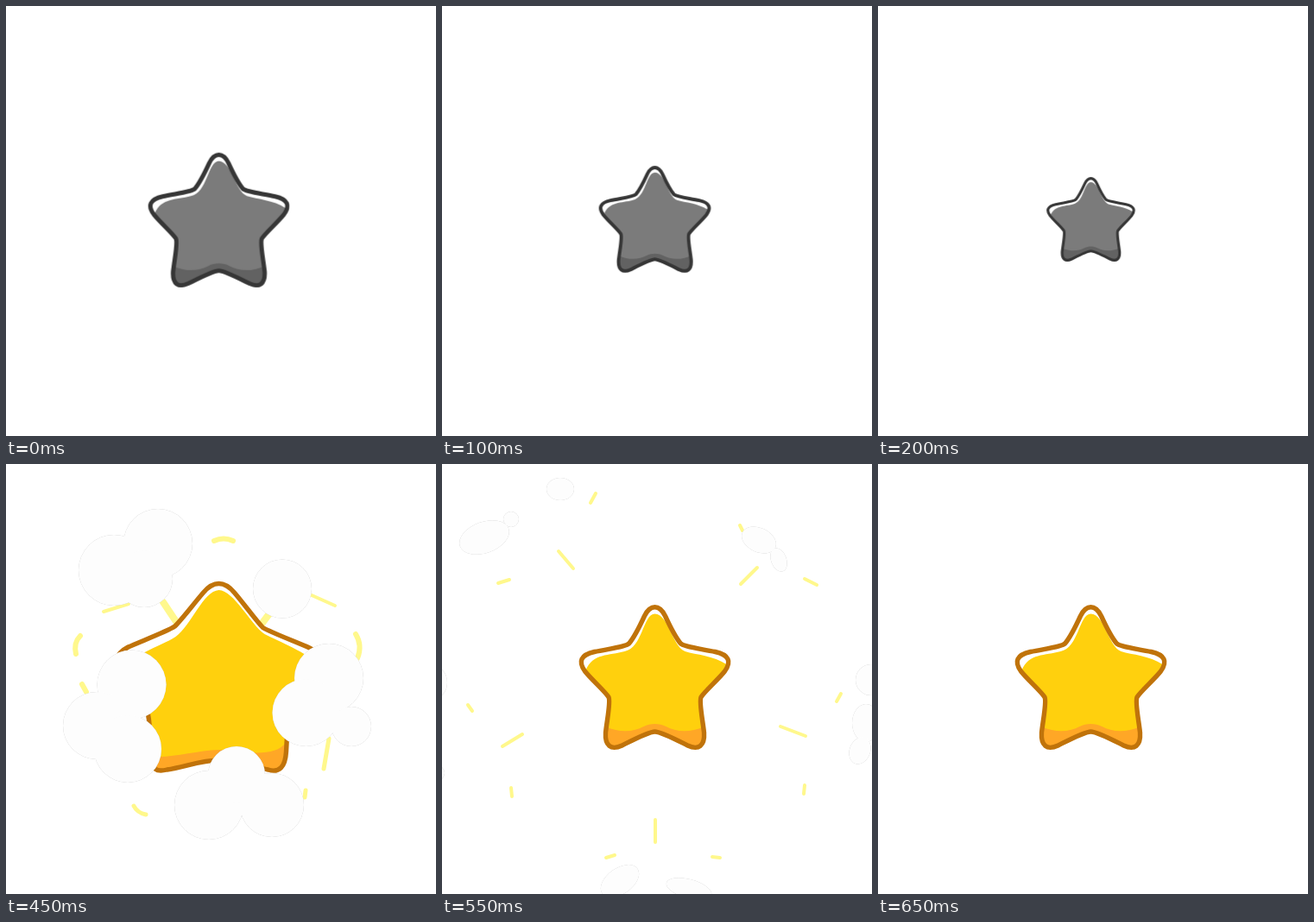
Animation, 498 px wide and 498 px high, one loop 700 ms. Source, as an HTML page without scripts:

```html
<!DOCTYPE html>
<html lang="en">
<head>
<meta charset="utf-8">
<title>Star burst</title>
<style>
  html, body { margin: 0; width: 100%; height: 100%; overflow: hidden; background: #fff; }
  svg { display: block; width: 100vw; height: 100vh; }

  .gray { --fill: #7b7b7b; --line: #363636; --shade: #626262; }
  .gold { --fill: #ffd00d; --line: #c0730a; --shade: #ffa726; }
  .body { fill: var(--fill); }
  .shade { fill: var(--shade); }
  .shine { fill: #fff; }
  .line { fill: none; stroke: var(--line); stroke-width: 5.4; stroke-linejoin: round; }

  .rays { fill: none; stroke: #fff88c; stroke-width: 4; stroke-linecap: round; }
  .clouds { fill: #fdfdfd; filter: drop-shadow(0 0 .5px #bbb); }

  /* Every animation shares the 700 ms loop and holds between keys. */
  .shrink, .rest, .beat { animation: 700ms step-end infinite; }
  .shrink { animation-name: shrink, until-burst; }
  .rest { animation-name: after-burst; }
  .beat { visibility: hidden; animation-name: beat; animation-delay: calc(var(--at) - 700ms); }

  @keyframes shrink {
    0% { transform: translateY(.9px) scale(.93); }
    7.142% { transform: translateY(.4px) scale(.832); }
    14.285% { transform: scale(.737); }
    21.428% { transform: scale(.656); }
    28.571%, 100% { transform: scale(.583); }
  }
  @keyframes until-burst {
    0% { visibility: visible; }
    64.285%, 100% { visibility: hidden; }
  }
  @keyframes after-burst {
    0% { visibility: hidden; }
    78.571%, 100% { visibility: visible; }
  }
  @keyframes beat {
    0% { visibility: visible; }
    7.142%, 100% { visibility: hidden; }
  }
</style>
</head>
<body>
<svg viewBox="0 0 498 498">
  <defs>
    <path id="calm-edge" d="M0-81.2C5-81.2 9-77 12-71C18-58 24-46 30-39C34-35 54-33 70-29.500C86-26 89-18 81-7C73 3 58 16 53.500 23C51 28 55 47 57 64C58 79 51 85 38 79C26 73 7 63 0 63C-7 63-26 73-38 79C-51 85-58 79-57 64C-55 47-51 28-53.500 23C-58 16-73 3-81-7C-89-18-86-26-70-29.500C-54-33-34-35-30-39C-24-46-18-58-12-71C-9-77-5-81.2 0-81.2Z"/>
    <g id="calm">
      <use href="#calm-edge" class="body"/>
      <path class="shine" d="M-80-8C-89-18-86-26-70-29.500C-54-33-34-35-30-39C-24-46-18-58-12-71C-9-77-5-81.2 0-81.2C5-81.2 9-77 12-71C18-58 24-46 30-39C34-35 54-33 70-29.500C84-26 87-20 83-15C68-25 48-26 35-30C20-36 16-73 0-73.500C-14-73-14-34-35-30C-53-25-72-28-80-8Z"/>
      <path class="shade" d="M-57 57C-40 65-24 63-13 57C-5 53 5 53 13 57C24 63 40 65 57 57V64C58 79 51 85 38 79C26 73 7 63 0 63C-7 63-26 73-38 79C-51 85-58 79-57 64Z"/>
      <use href="#calm-edge" class="line"/>
    </g>

    <path id="plump-edge" d="M0-93C7-93 12-88 16-82C25-69 34-55 42-47C47-43 68-40 80-36C97-31 102-20 94-8C86 4 70 20 66.500 31C64 44 67 60 67 75C67 92 62 98 45 92C30 87 10 78.500 0 78.500C-10 78.500-30 87-45 92C-62 98-67 92-67 75C-67 60-64 44-66.500 31C-70 20-86 4-94-8C-102-20-97-31-80-36C-68-40-47-43-42-47C-34-55-25-69-16-82C-12-88-7-93 0-93Z"/>
    <g id="plump">
      <use href="#plump-edge" class="body"/>
      <path class="shine" d="M-93-8C-102-20-97-31-80-36C-68-40-47-43-42-47C-34-55-25-69-16-82C-12-88-7-93 0-93C7-93 12-88 16-82C25-69 34-55 42-47C47-43 68-40 80-36C95-31 99-22 95-14C80-27 60-33 48-39C29-51 17-84 0-85C-14-84-18-47-34-41C-57-32-82-34-93-8Z"/>
      <path class="shade" d="M-67 68C-48 80-28 76-14 71C-5 68 5 68 14 71C28 76 48 80 67 68V75C67 92 62 98 45 92C30 87 10 78.500 0 78.500C-10 78.500-30 87-45 92C-62 98-67 92-67 75Z"/>
      <use href="#plump-edge" class="line"/>
    </g>

    <path id="swollen-edge" d="M0-108.500C8-108.500 13-104 18-98C30-84 42-67 51-57.500C60-52 92-40 105-34C120-27 122-17 114-4C100 14 85 28 82 43C79 58 79 70 78 86C77 104 70 111 57 107C40 103 20 96 0 96C-20 96-40 104-60 107C-72 110-78 108-79 88C-80 70-79 58-82 43C-85 28-100 14-114-4C-122-17-120-27-105-35C-92-41-60-53-51-59C-42-68-30-84-18-98C-13-104-8-108.500 0-108.500Z"/>
    <g id="swollen">
      <use href="#swollen-edge" class="body"/>
      <path class="shine" d="M-114-4C-122-17-120-27-105-35C-92-41-60-53-51-59C-42-68-30-84-18-98C-13-104-8-108.500 0-108.500C8-108.500 13-104 18-98C30-84 42-67 51-57.500C60-52 92-40 105-34C118-27 120-20 114-14C105-28 68-42 53-50C36-62 18-100 0-101C-18-100-32-60-50-47C-68-35-107-25-114-4Z"/>
      <path class="shade" d="M-79 91C-60 95-28 85 0 84C25 85 65 95 78 75V86C77 104 70 111 57 107C40 103 20 96 0 96C-20 96-40 104-60 107C-72 110-78 108-79 88Z"/>
      <use href="#swollen-edge" class="line"/>
    </g>
  </defs>

  <g transform="translate(246.5 247)">
    <use href="#calm" class="gray shrink"/>
    <use href="#calm" class="gold rest"/>
  </g>

  <g class="beat" style="--at: 450ms">
    <g class="rays">
      <path d="M113 171L142 162M354 152L381 164"/>
      <path d="M148 396Q152 404 162 406M374 318L368 353M347 378L346 386" style="stroke-width: 5"/>
      <path d="M241 89Q252 84 263 89M86 199Q78 207 81 220M405 197Q413 210 407 225M88 255L93 264" style="stroke-width: 6"/>
      <path d="M182 160L198 184M297 184L306 172" style="stroke-width: 8"/>
    </g>
    <use href="#swollen" class="gold" x="246.5" y="247"/>
    <g class="clouds">
      <circle cx="176" cy="92" r="40"/><circle cx="125" cy="123" r="41"/><circle cx="160" cy="133" r="33"/>
      <circle cx="320" cy="144.500" r="34"/>
      <circle cx="145.500" cy="255.500" r="40"/><circle cx="105" cy="303" r="39"/><circle cx="141" cy="330" r="39"/>
      <circle cx="374" cy="248" r="40"/><circle cx="347.500" cy="288" r="39"/><circle cx="400" cy="304" r="23"/>
      <circle cx="235" cy="395" r="40"/><circle cx="267" cy="360" r="33"/><circle cx="308" cy="395" r="37"/>
    </g>
  </g>

  <g class="beat" style="--at: 500ms">
    <g class="rays">
      <path d="M181 54L158 92M87 147L113 134M385 137L415 151M330 93L339 103M70 290L71 294M350 289L397 304M403 339L396 370M291 428L316 430M87 316L136 293"/>
      <path d="M149 120L187 173M306 174L353 133" style="stroke-width: 5"/>
      <path d="M250 55H255M38 203H38.500M434 204H435M248 373L249 397M142 431H142.500M363 411H363.500" style="stroke-width: 7"/>
    </g>
    <use href="#plump" class="gold" x="246.5" y="247"/>
    <g class="clouds">
      <circle cx="156" cy="58" r="24"/>
      <circle cx="117" cy="106" r="27"/><circle cx="70" cy="120" r="26"/><path d="M78 96L96 90L110 132L90 138Z"/>
      <ellipse cx="364" cy="112" rx="28" ry="20" transform="rotate(32 364 112)"/>
      <circle cx="51" cy="242" r="25"/><circle cx="44" cy="266" r="31"/><circle cx="32" cy="301" r="30"/>
      <ellipse cx="66" cy="348" rx="42" ry="33" transform="rotate(36 66 348)"/>
      <circle cx="446" cy="260" r="27"/><circle cx="436" cy="287" r="21"/><circle cx="452" cy="317" r="14"/>
      <circle cx="205" cy="442" r="29"/><ellipse cx="248" cy="422" rx="30" ry="25"/><circle cx="223" cy="423" r="18"/>
      <circle cx="286" cy="443" r="24"/><circle cx="322" cy="450" r="19"/>
    </g>
  </g>

  <g class="beat" style="--at: 550ms">
    <path class="rays" d="M178 34L172 45M135 101L152 121M65 138L78 134M345 71L348 77M346 139L365 120M420 133L434 140M30 279L35 286M462 266L457 275M70 327L93 313M392 304L421 315M80 375L81 385M420 372L419 382M247 412V438M190 456L200 453M313 455L322 456"/>
    <g class="clouds">
      <ellipse cx="137" cy="29" rx="16" ry="13"/>
      <ellipse cx="49" cy="85" rx="30" ry="18" transform="rotate(-20 49 85)"/><circle cx="80" cy="64" r="9"/>
      <ellipse cx="367" cy="88" rx="21" ry="14" transform="rotate(25 367 88)"/>
      <ellipse cx="390" cy="111" rx="9" ry="14" transform="rotate(-20 390 111)"/>
      <ellipse cx="-6" cy="253" rx="12" ry="17"/><circle cx="-6" cy="358" r="9"/>
      <circle cx="497" cy="250" r="18"/>
      <ellipse cx="491" cy="300" rx="16" ry="22"/><ellipse cx="484" cy="332" rx="12" ry="16" transform="rotate(20 484 332)"/>
      <ellipse cx="206" cy="483" rx="25" ry="15" transform="rotate(-35 206 483)"/>
      <ellipse cx="286" cy="492" rx="27" ry="11" transform="rotate(15 286 492)"/>
    </g>
  </g>

  <g class="beat" style="--at: 600ms">
    <path class="rays" d="M127 92L133 99M56 141L61 139M373 112L368 117M440 143L445 145M61 332L68 328M424 316L432 319M247 442V451M466 258L464 262" style="stroke-width: 2.5"/>
  </g>
</svg>
</body>
</html>
```
